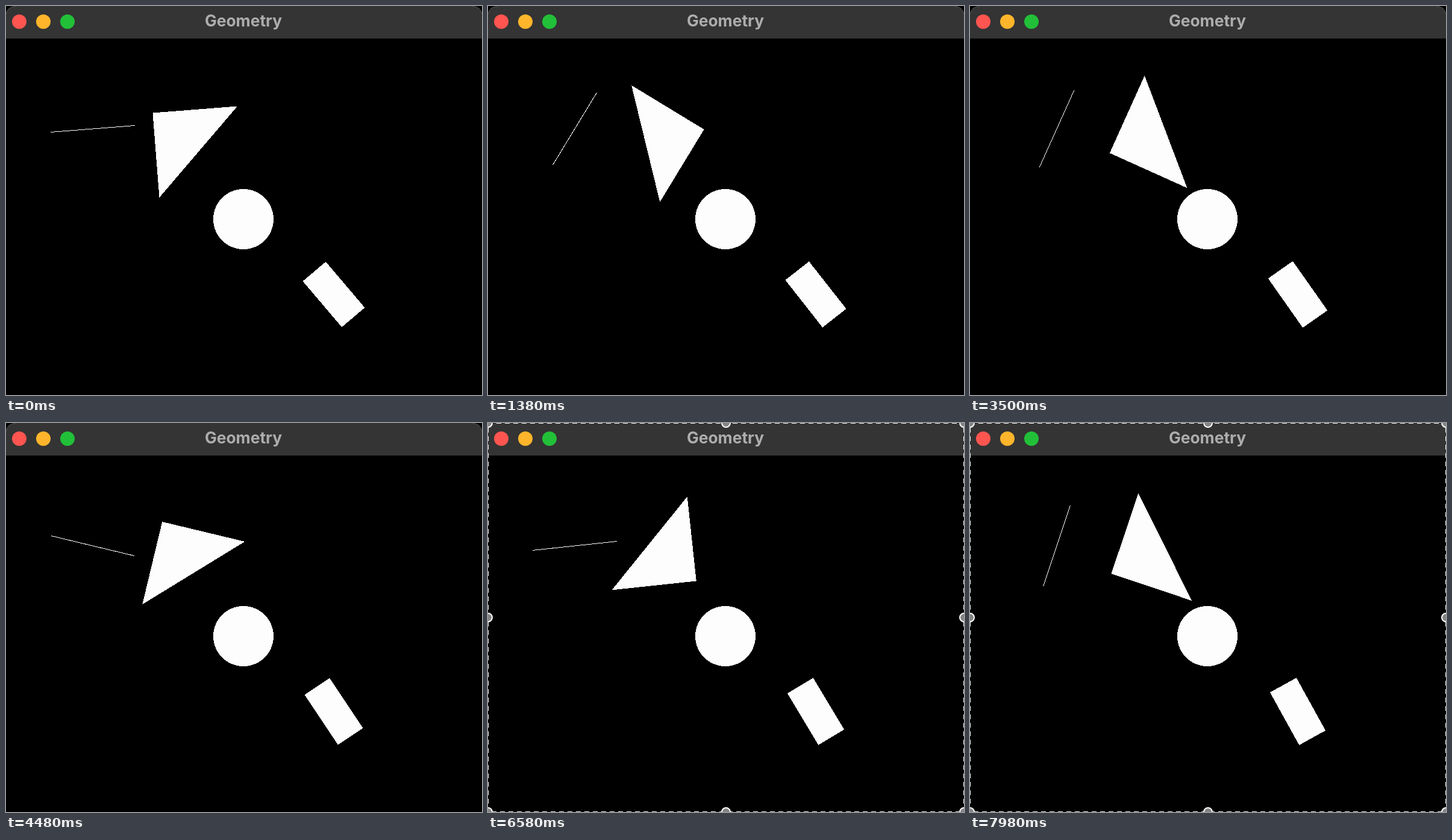
An HTML page that plays this animation: 790 px wide and 646 px high, repeating every 8 s.

```html
<!DOCTYPE html>
<html lang="en">
<head>
<meta charset="utf-8">
<title>Geometry</title>
<style>
  html, body { margin: 0; width: 100%; height: 100%; overflow: hidden; background: #000; }
  svg { display: block; width: 790px; height: 646px; }
  text { font: 700 26.4px Inter, "Open Sans", sans-serif; fill: #adadad; text-anchor: middle; }
  .shapes { fill: #fdfdfd; stroke: none; shape-rendering: crispEdges; }
  .dashes { fill: none; stroke: #fff; stroke-width: 2; stroke-dasharray: 8 6; }
  .handle { fill: #848484; stroke: #fff; stroke-width: 2; }
</style>
</head>
<body>
<svg viewBox="0 0 790 646">
  <path d="M0 54V18Q0 0 18 0H772Q790 0 790 18V54Z" fill="#343434"/>
  <path d="M0 14Q2 1 16 .5M774 .5Q788 1 790 14" fill="none" stroke="#555"/>
  <circle cx="22" cy="26" r="12" fill="#ff5550"/>
  <circle cx="62" cy="26" r="12" fill="#ffb52b"/>
  <circle cx="102" cy="26" r="12" fill="#22c038"/>
  <text x="394" y="34">Geometry</text>
  <g class="shapes">
    <line id="line" x1="-70.5" x2="70.5" stroke="#fdfdfd"/>
    <path id="triangle" d="M-47-47H94L-47 94Z"/>
    <circle cx="394" cy="354" r="50"/>
    <rect id="box" x="-50" y="-25" width="100" height="50"/>
  </g>
  <g id="selection">
    <rect class="dashes" width="790" height="646"/>
  </g>
</svg>
<script>
const LOOP = 8000;
const STEP = 40;
const PAUSE = 120;
const SELECT_AT = 5720;

// Key poses: time in ms, turn in degrees.
const poses = [
  [0, -4.5], [1380, 121.3], [2080, 171], [2500, 213.4],
  [4480, 373.5], [5620, 465.2], [6580, 533.9], [7980, 648.5]
];

// Moments where the picture stalls.
const pauses = [1560, 2080, 2960, 3360, 4200, 4480, 4920, 5620, 6600, 7440];

const byId = id => document.getElementById(id);
const selection = byId("selection");

for (const x of [0, 395, 790]) {
  for (const y of [0, 323, 646]) {
    if (x === 395 && y === 323) continue;
    const handle = document.createElementNS("http://www.w3.org/2000/svg", "circle");
    const look = { class: "handle", cx: x, cy: y, r: 7 };
    for (const key in look) handle.setAttribute(key, look[key]);
    selection.append(handle);
  }
}

function redrawTime(time) {
  const stall = pauses.find(start => time >= start && time < start + PAUSE);
  return stall ?? Math.max(0, Math.floor((time + STEP / 2) / STEP) * STEP - STEP / 2);
}

function turnAt(time) {
  const next = Math.max(1, poses.findIndex(([t]) => t >= time));
  const [t0, a0] = poses[next - 1];
  const [t1, a1] = poses[next];
  return a0 + (a1 - a0) * (time - t0) / (t1 - t0);
}

function place(id, x, y, angle) {
  byId(id).setAttribute("transform", `translate(${x} ${y}) rotate(${angle})`);
}

function draw(time) {
  const angle = turnAt(redrawTime(time));
  place("line", 144, 204, angle);
  place("triangle", 294, 220.7, angle);
  // The box turns one degree for each radian of the others.
  place("box", 544, 479, 49.75 + angle * Math.PI / 180);
  selection.style.display = time >= SELECT_AT ? "" : "none";
}

const origin = performance.now();
function tick() {
  draw((performance.now() - origin) % LOOP);
  requestAnimationFrame(tick);
}
tick();
</script>
</body>
</html>
```
